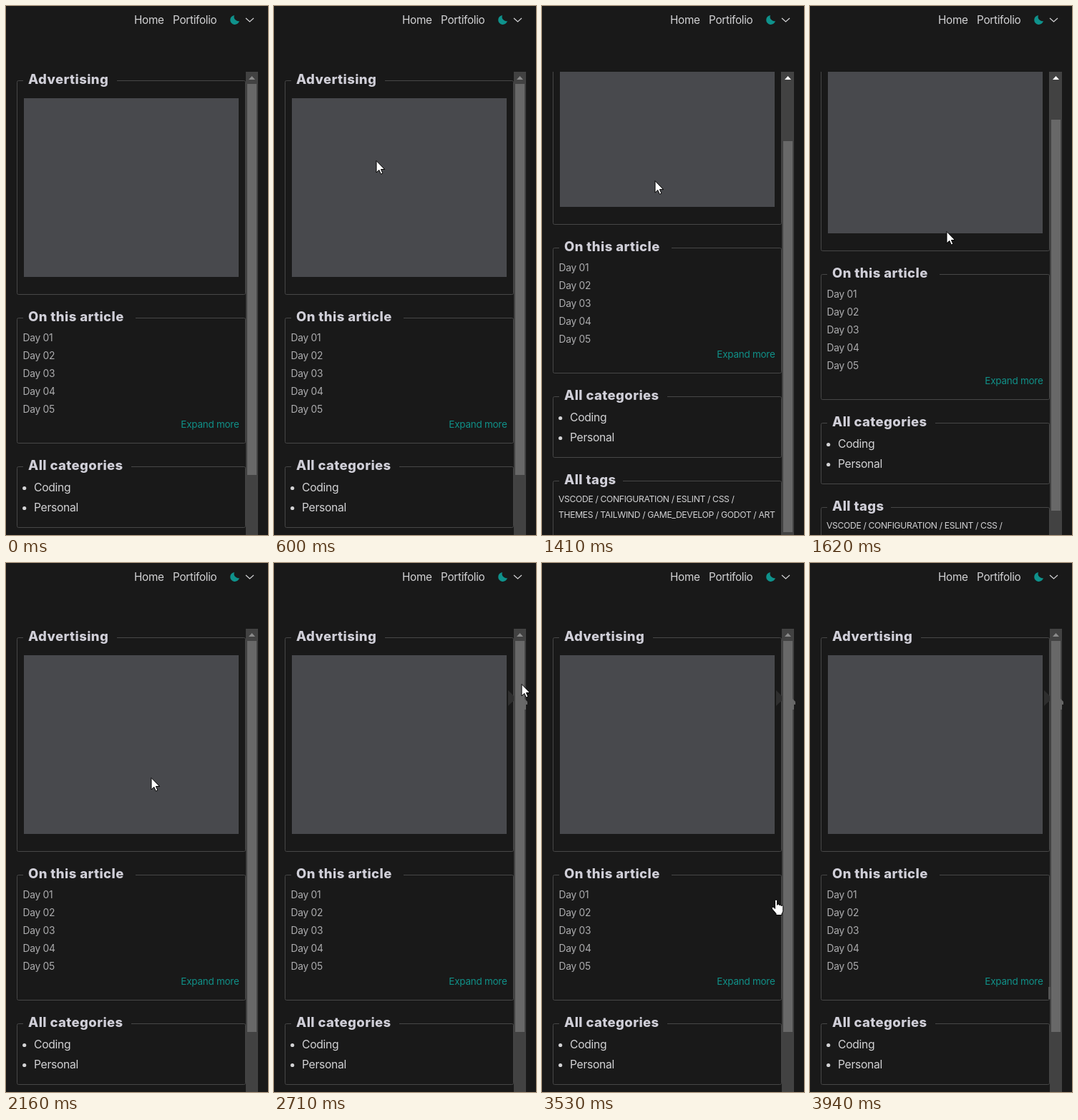
An HTML page for the animation above (4.73 s loop, 366 by 740 pixels).

```html
<!DOCTYPE html>
<html lang="en">
<head>
<meta charset="utf-8">
<title>Sidebar scroll</title>
<style>
  html, body { margin: 0; width: 100%; height: 100%; overflow: hidden; background: #191919; }
  svg { display: block; }
  text { font-family: Inter, Roboto, sans-serif; letter-spacing: -.02em; fill: #d3d3d5; white-space: pre; }
  .nav { font-size: 15.3px; }
  .head { font-size: 18.5px; font-weight: 800; letter-spacing: .022em; fill: #d0cfd8; }
  .day { font-size: 13.8px; fill: #acacae; }
  .more { font-size: 13.5px; fill: #109088; text-anchor: end; }
  .item { font-size: 15.7px; }
  .tag { font-size: 12.2px; letter-spacing: -.03em; }
  .line { fill: none; stroke: #474747; }
  .pointer { fill: #fff; stroke: #000; stroke-linejoin: round; }
</style>
</head>
<body>
<svg width="366" height="740" viewBox="0 0 366 740">
  <clipPath id="view"><rect y="92" width="366" height="648"/></clipPath>
  <rect width="366" height="740" fill="#191919"/>
  <text class="nav" x="179" y="25">Home</text>
  <text class="nav" x="233" y="25">Portifolio</text>
  <path fill="#0f928c" d="M319 13A6.5 6.5 0 1 0 326 21A6 6 0 0 1 319 13Z"/>
  <path fill="none" stroke="#d3d3d5" stroke-width="1.2" d="M335 17L340.5 22L346 17"/>

  <g clip-path="url(#view)">
    <g id="page">
      <rect x="25" y="129" width="300" height="250" fill="#48494d"/>
    </g>
    <rect x="335" y="92" width="17" height="648" fill="#424242"/>
    <path id="arrow" d="M339 103L343.5 98L348 103Z"/>
    <rect id="thumb" x="337" y="109" width="13" height="547"/>
  </g>
  <g id="trail">
    <path fill="#2e2e2e" d="M327 178L335 186V193L331 196L327 200Z"/>
    <path fill="#666" d="M350 190L354 194V198H352V205H350Z"/>
  </g>
  <rect id="mark" x="333" y="593" width="3" height="17" fill="#555"/>
  <path id="pointer" class="pointer"/>
</svg>
<script>
  const LOOP = 4730, STEP = 68, LEAD = 24;
  const $ = id => document.getElementById(id);
  const page = $('page');

  function add(tag, attrs, text = '') {
    const el = document.createElementNS('http://www.w3.org/2000/svg', tag);
    for (const key in attrs) el.setAttribute(key, attrs[key]);
    el.textContent = text;
    page.append(el);
  }
  const label = (cls, x, y, text) => add('text', { class: cls, x, y }, text);

  // Bordered panel with a gap in its top edge for the heading
  function panel(title, top, height, gapEnd) {
    add('path', {
      class: 'line',
      d: `M24 ${top + .5}h-6.5q-2 0 -2 2v${height - 5}q0 2 2 2h315q2 0 2 -2v${5 - height}q0 -2 -2 -2H${gapEnd}`
    });
    label('head', 31, top + 5, title);
  }

  panel('Advertising', 104, 300, 155);
  panel('On this article', 436, 176, 181);
  panel('All categories', 644, 86, 175);
  panel('All tags', 762, 98, 113);
  for (let i = 0; i < 5; i++) label('day', 23.5, 469 + 25 * i, 'Day 0' + (i + 1));
  label('more', 325.5, 590, 'Expand more');
  ['Coding', 'Personal'].forEach((name, i) => {
    add('circle', { cx: 25.7, cy: 674.5 + 28 * i, r: 2.6, fill: '#d3d3d5' });
    label('item', 39, 679 + 28 * i, name);
  });
  label('tag', 23, 792, 'VSCODE / CONFIGURATION / ESLINT / CSS /');
  label('tag', 23, 814, 'THEMES / TAILWIND / GAME_DEVELOP / GODOT / ART');

  // Pointer sweeps, each a quadratic curve starting where the last one ended
  const sweeps = [
    { from: 1, to: 8, bend: [0, 300], end: [143, 216.5] },
    { from: 20, to: 24, bend: [175, 275], end: [191, 315.5] },
    { from: 31, to: 32, bend: [197, 308], end: [203, 300.5] },
    { from: 32, to: 40, bend: [390, 180], end: [346, 169.5] },
    { from: 40, to: 47, bend: [360, 290], end: [339, 400] },
    { from: 47, to: 52, bend: [295, 430], end: [326.5, 470.5] },
    { from: 52, to: 57, bend: [315, 580], end: [350, 709] }
  ];

  const progress = (k, from, to) => Math.min(1, Math.max(0, (k - from) / (to - from)));

  function tip(k) {
    let pos = [313, 705];
    for (const { from, to, bend, end } of sweeps) {
      const u = progress(k, from, to), v = 1 - u;
      pos = pos.map((p, i) => v * v * p + 2 * u * v * bend[i] + u * u * end[i]);
    }
    return pos;
  }

  // One wheel notch down with a smooth stop, then an accelerating return
  function scrollAt(k) {
    const down = progress(k, 12, 16), up = progress(k, 20, 26);
    return 100 * (down * down * (3 - 2 * down) - up ** 2.3);
  }

  const within = ([x, y], left, top, right, bottom) => x > left && x < right && y > top && y < bottom;
  const show = (id, on) => $(id).setAttribute('visibility', on ? 'visible' : 'hidden');

  const ARROW = 'M0 0V16.5L3.8 12.9L6.3 18.6L8.9 17.5L6.4 12H11.6Z';
  const HAND = 'M5 13V2Q5 .5 6.5 .5T8 2V8Q8 6.5 9.5 6.5T11 8V8.5Q11 7.5 12.4 7.5T13.6 9V9.5' +
    'Q13.8 8.5 15 8.5T16.3 10V16Q16 18.5 14.5 20V22H6.5V20L1 13.5Q0 11.5 1.5 11T4 12Z';

  function draw(now) {
    const k = Math.floor((now % LOOP + LEAD) / STEP);
    const offset = Math.round(scrollAt(k));
    page.setAttribute('transform', `translate(0 ${-offset})`);
    $('arrow').setAttribute('fill', offset ? '#fff' : '#8a8a8a');

    // The thumb lights up one step after the pointer reaches it
    const hover = within(tip(k - 1), 337, 109, 350, 656);
    $('thumb').setAttribute('y', 109 + Math.round(offset * .815));
    $('thumb').setAttribute('fill', hover ? '#7a7a7a' : '#686868');

    const [x, y] = tip(k);
    const hand = within([x, y], 24, 440, 327, 596);
    $('pointer').setAttribute('d', hand ? HAND : ARROW);
    $('pointer').setAttribute('transform', `translate(${hand ? x - 6 : x} ${y})`);
    show('pointer', k >= 1 && k < 58);
    show('trail', k >= 39);
    show('mark', k >= 56);
  }

  const start = performance.now();
  function loop() {
    draw(performance.now() - start);
    requestAnimationFrame(loop);
  }
  loop();
</script>
</body>
</html>
```
